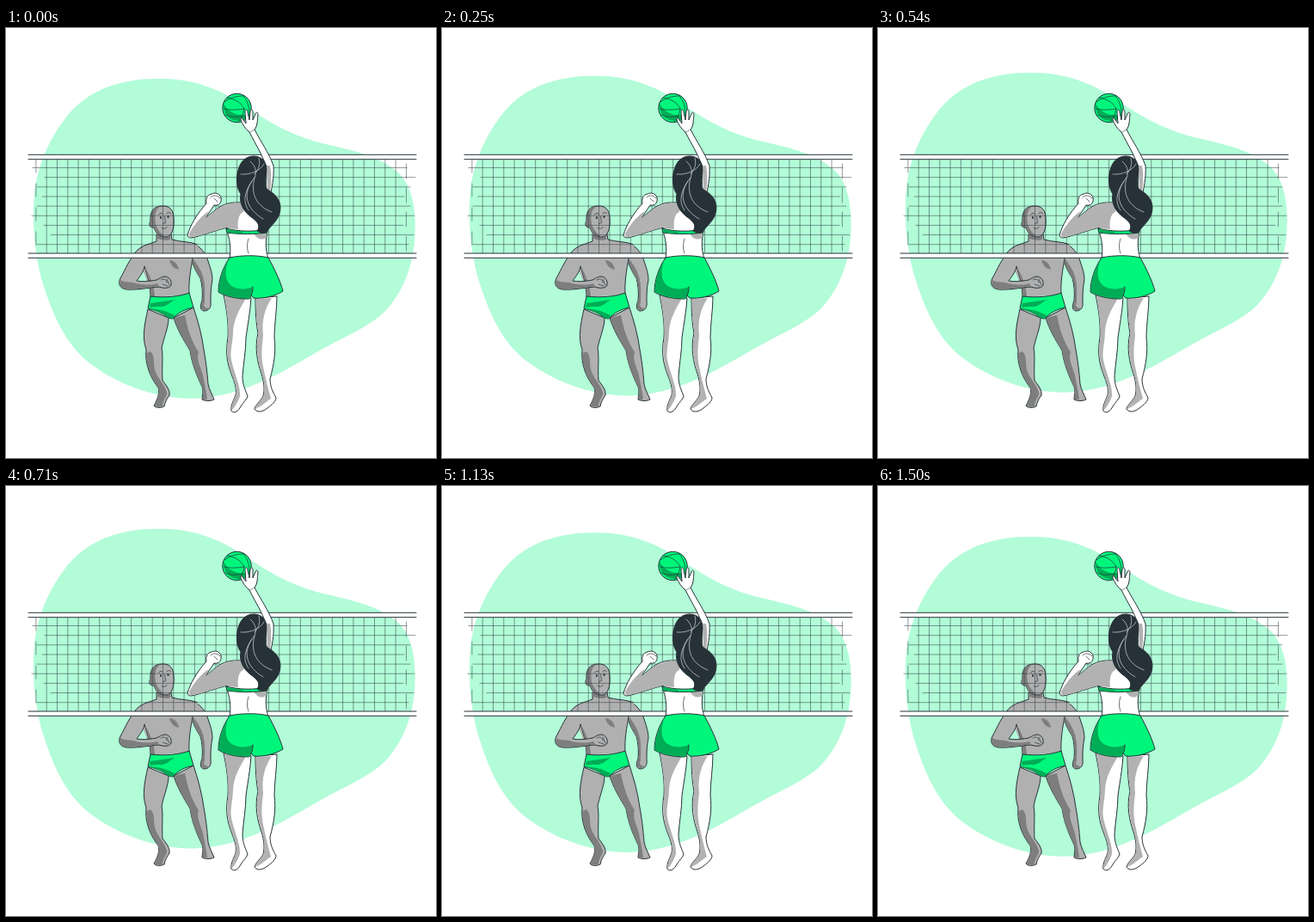
Recreate the animation shown at these times as an HTML page. Size 500 by 500 pixels, loop 1540 ms.

```html
<!DOCTYPE html>
<html lang="en">
<head>
<meta charset="utf-8">
<title>Beach volleyball</title>
<style>
  html, body { margin: 0; width: 100%; height: 100%; overflow: hidden; background: #fff; }
  svg { display: block; width: 100vw; height: 100vh; }
  .line { fill: none; stroke: #263238; stroke-width: 1; stroke-linecap: round; stroke-linejoin: round; }
  .ink path, .ink circle { stroke: #263238; stroke-width: 1; stroke-linejoin: round; }
  .ink .shade { stroke: none; }
  .ink .thin { stroke-width: .7; }
  .ink .mesh { stroke-width: .5; }
  .ink .shine { stroke: #c9cdcf; stroke-width: .75; }
  .main { fill: #00f67b; }
  .deep { fill: #00ac56; }
  .skin { fill: #fff; }
  .grey { fill: #b2b2b2; }
  .man { fill: #b0b0b0; }
  .dim { fill: #7e7e7e; }
  .hair { fill: #263238; }
</style>
</head>
<body>
<svg viewBox="0 0 500 500">
  <path id="blob" fill="#b2fcd8" d="M181 59 C216 59 247 70 275 89 C302 107 328 123 360 132 C394 141 432 146 457 169 C472 184 477 211 475.500 238 C475 269 465 303 442 328 C423 348 390 360 358 379 C318 402 274 428 222 430.500 C177 433 126 413 95 388 C63 361 51 322 41 291 C33 260 30 225 33 193 C36 162 50 128 72 101 C98 70 137 58 181 59Z"/>

  <g class="ink">
    <!-- player behind the net -->
    <path class="man" d="M165 327 C161 345 158 360 163 374 C161 392 169 408 177 418 C179 425 176 432 172 439 C174 442 180 442 184 440 C185 434 188 430 190 427 C191 421 186 415 182 410 C181 395 183 382 181 372 C184 358 189 348 189 337Z"/>
    <path class="dim shade" d="M163.500 378 C162 392 170 408 177 418 C179 426 176 432 173 439 C176 441 180 441 182 440 C182 432 188 428 187 424 C184 413 176 408 173 397 C171 389 174 383 168 376Z"/>
    <path class="man" d="M195 337 C199 350 206 362 214 375 C216 390 222 405 228 417 C230 423 228 428 228 432 C232 434 238 434 242 432 C240 427 236 420 235 414 C234 400 232 385 230 374 C228 358 223 340 218 325Z"/>
    <path class="dim shade" d="M196 337 C199 349 206 362 214 375 C216 390 222 405 228 417 C230 423 229 428 229 432 L234 432 C233 423 231 415 229 404 C226 393 221 385 224 377 C215 363 211 349 208 334Z"/>
    <path class="man" d="M217 251 C226 253 232 262 235 271 C238 280 240 286 240 293 C238 302 238 310 238 318 C239 325 236 329 230 329 C225 328 226 322 228 317 C229 308 228 298 226 291 C220 282 217 275 216 268Z"/>
    <path class="dim shade" d="M217 267 C222 275 228 282 230 293 C232 302 231 311 231 319 C229 323 231 326 236 326 C233 329 226 329 227 323 L229 313 C229 303 228 296 226 291 C220 282 217 275 217 267Z"/>
    <path class="man shade" d="M175 238 L175 248 C165 252 155 253 149 263 C158 278 166 294 168 313 L213 310 C212 295 215 280 217 270 C224 264 225 257 222 251 C213 248 203 249 193 246 L192 236Z"/>
    <path class="line" d="M175 240 L175 248 C165 252 155 253 149 263 M161 277 C165 290 168 300 168 312 M213 309 C212 295 215 280 217 268 M222 251.500 C213 248 203 249 193 246 L192 240"/>
    <path class="dim shade" d="M175 239 C180 243 185 244 191 242 L191 246 C184 248 178 246 175 244Z M190 270 C195 270 200 274 201 281 C196 280 191 276 190 270Z M161 277 C165 288 168 300 168 312 L173 312 C172 300 168 288 161 277Z"/>
    <path class="man" d="M151 261 C144 268 139 280 133 291 C130 297 132 303 140 304 C152 305 165 302 178 301 C183 303 190 303 192 299 C193 294 190 290 186 289 C180 289 178 292 175 293 C165 295 157 295 152 294 C156 288 160 284 161 277"/>
    <path class="dim shade" d="M133 293 C131 299 134 303 140 303.500 C152 304 165 302 178 300 L176 297 C164 300 154 298 148 296 C143 295 137 296 133 293Z"/>
    <path class="line thin" d="M180 293 C183 291 187 292 187 296 M182 298 L188 300 M187 292 L190 299"/>
    <path class="main" d="M168 312 C185 314 203 312 213 308 L218 325 C208 327 200 331 194 338 C189 338 187 336 186 335 C180 330 172 328 165 326Z"/>
    <path class="deep shade" d="M168 320 C178 319 187 317 196 316 C189 320 186 325 178 324 C174 324 170 324 167 325Z M167 326.500 C178 326 188 330 196 334 L194 337.500 C189 337.500 187 336 186 335 C180 330 172 328 167 326.500Z"/>
    <path class="man" d="M168 225 C167 213 172 207 181 207 C190 206 195 212 195 221 C196 232 193 243 186 243 C178 243 174 238 172 232 C168 233 165 228 168 225Z"/>
    <path class="dim shade" d="M169 224 C168 214 172 208 179 207.600 C172 213 173 221 174 228 C176 235 181 240 186 242.500 C179 243 174 238 172 232 C168 232 167 227 169 224Z"/>
    <path class="line thin" d="M184.500 219 L185.500 226.500 L182.500 227.500 M181 232.500 C183 234 186 233.500 187 231.500 M177.500 217 C178.500 215 181 215 182 216 M187 215.500 C188.500 214 190.500 214.500 191.500 215.500"/>
    <ellipse class="hair" cx="180" cy="220.500" rx="1" ry="1.600"/>
    <ellipse class="hair" cx="188.500" cy="219.500" rx="1" ry="1.600"/>

    <!-- net -->
    <path id="mesh" class="line mesh"/>
    <path class="shade" fill="#fff" d="M26 147.300H477V152.700H26Z M26 262H477V267.300H26Z"/>
    <path class="line" d="M26 147.300H477 M26 152.700H477 M26 262H477 M26 267.300H477"/>

    <!-- ball -->
    <circle class="main" cx="268.500" cy="93" r="16.700"/>
    <path class="deep shade" d="M253 88 C252 102 264 112 279 106 C281 104 283 102 284 99 C275 104 260 101 253 88Z"/>
    <path class="line thin" d="M254 86 C262 80 270 79 276 79 M257 81 C266 82 274 87 277 94 M276 79 C281 85 283 92 283 99 M254 94 C261 96 270 95 277 94 M277 94 C276 100 274 106 270 109 M255 101 C262 104 269 104 275 102"/>

    <!-- player in front -->
    <path class="skin" d="M253 310 C257 330 259 345 258 360 C255 378 257 390 263 405 C267 415 268 420 267 427 C264 434 261 440 262 445 C265 449 270 446 273 440 C276 435 280 432 281 428 C279 422 275 416 275 405 C276 390 279 375 279 360 C281 345 284 330 285 314Z"/>
    <path class="grey shade" d="M254 311 C257 330 259 345 258.500 360 C256 378 258 390 263.500 405 C268 415 268 422 267.500 427 C264 434 262 440 262.500 445 C266 441 270 434 272 428 C273 416 265 401 262 386 C260 376 264 365 264 353 C265 337 272 327 279 314Z"/>
    <path class="skin" d="M290 314 C290 330 291 345 293 355 C289 372 292 388 297 402 C300 412 301 420 299 428 C296 434 290 438 289 443 C292 448 299 446 304 442 C309 438 314 434 314 430 C311 424 307 418 307 408 C312 390 314 375 312 360 C312 345 315 328 315 312Z"/>
    <path class="grey shade" d="M291 315 C290 330 292 345 293.500 355 C290 372 293 388 297.500 402 C301 412 301 420 299.500 428 C296 434 291 438 289.500 443 C296 441 302 435 308 431 C305 420 302 408 299 394 C296 379 298 368 299 357 C297 340 301 326 309 314Z"/>
    <path class="skin" d="M283 121 C290 135 298 147 302 160 C304 176 302 187 300 200 L271 203 C263 204 259 207 256 213 L256 233 C260 244 262 256 260 267 L305 268 C301 256 302 247 304 236 C305 222 305 210 306 200 C309 187 312 174 311 160 C305 144 296 132 289 118Z"/>
    <path class="grey shade" d="M257 213 C260 206 268 203 279 203 L276 214 C270 216 269 226 270 234 L257 233Z M288 239 C292 246 298 247 302 244 L304 237 L290 238Z M303 160 C305 174 304 186 302 196 L306 195 C309 181 309 171 307 160Z"/>
    <path class="skin" d="M271 203 C258 202 249 207 243 212 L232 221 L242 206 C248 207 251 203 250 197 C248 192 243 191 239 193 C234 194 232 198 233 204 C222 216 214 230 211 241 C212 245 216 244 220 243 C235 239 248 234 258 232"/>
    <path class="grey shade" d="M271 203.500 C258 203 249 208 243 212.500 L232 221 L236 213 C231 215 220 226 213 239 C212 244 216 243 220 242.500 C235 239 248 234 260 231 L270 222Z"/>
    <path class="line thin" d="M238 197 C240 194 246 194 249 198 M242 198 L246 202"/>
    <path class="main" d="M256 233 C270 237 290 237 304 234 L303.500 238 C290 240 270 240 257 238Z"/>
    <path class="deep shade" d="M257 234 C264 236 270 236.500 276 236.500 L274 239 C268 239 262 239 258 237.500Z"/>
    <path class="line thin" d="M282 245 C280 251 280 257 282 262"/>
    <path class="main" d="M260 267 C275 264 292 264 305 267 C312 280 319 294 322 306 C312 312 300 315 288 314 L285 311 C284 315 283 315 281 315 C268 315 255 312 247 307 C247 293 252 279 260 267Z"/>
    <path class="deep shade" d="M258 271 C252 282 248 294 247.500 306.500 C256 311 270 315 283 314 L285 311 L287 301 C278 305 266 304 260 298 C254 291 255 281 258 271Z"/>
    <path class="line" d="M285 311 C287 307 287 304 287 301"/>
    <path class="skin" d="M283 121 C278 117 275 112 273 107 C272 104 275 104 276 107 L279 111 L278 98 C278 94 281 94 281 98 L283 107 L284 97 C285 94 287 94 287 98 L287 107 L290 100 C291 97 293 98 293 101 C292 107 293 113 289 118"/>
    <path class="hair" d="M288 149 C297 149 303 155 303 165 C303 174 299 182 304 188 C312 192 319 199 319 209 C319 223 308 229 303 237 C299 239 295 238 292 236 C297 229 291 224 284 219 C275 212 271 202 273 193 C268 186 267 175 270 165 C273 154 280 149 288 149Z"/>
    <path class="line shine" d="M273 170 C284 171 296 166 300 158 M284 155 C290 160 292 167 289 174 C273 193 280 211 299 222 M289 174 C284 193 291 207 309 214 M286 178 C276 193 276 203 282 212 M294 151 C296 159 294 164 289 170"/>
  </g>
</svg>
<script>
const LOOP = 1540, FPS = 24, RISE = 10, LEAD = 25;
const blob = document.getElementById("blob");

// Net mesh with ragged ends
function mesh() {
  const left = 47.2, gap = 12.3, cols = 34, top = 162.5, row = 11.15;
  const starts = [31, 45, 36, 42, 36, 30, 44, 52, 36];
  const ends = [466, 476, 470, 463, 470, 475, 462, 474, 468];
  let d = "";
  starts.forEach((x, i) => d += `M${x} ${top + row * i}H${ends[i]}`);
  for (let i = 0; i < cols; i++) d += `M${left + gap * i} 153V262`;
  for (let y = 153; y < 255; y += 28) {
    d += `M${left - gap} ${y}v15 M${left + gap * cols} ${y + 5}v17`;
  }
  return d;
}
document.getElementById("mesh").setAttribute("d", mesh());

// The backdrop rises and sinks at a constant speed, in film steps
function draw(ms) {
  const t = ms % LOOP;
  const step = Math.floor((t + 4.9) * FPS / 1000) * 1000 / FPS;
  const p = ((step + LEAD) % LOOP) / LOOP;
  const lift = RISE * (1 - Math.abs(1 - 2 * p));
  blob.setAttribute("transform", `translate(0 ${(0.3 - lift).toFixed(3)})`);
}

const start = performance.now();
function tick() {
  draw(performance.now() - start);
  requestAnimationFrame(tick);
}
tick();
</script>
</body>
</html>
```
